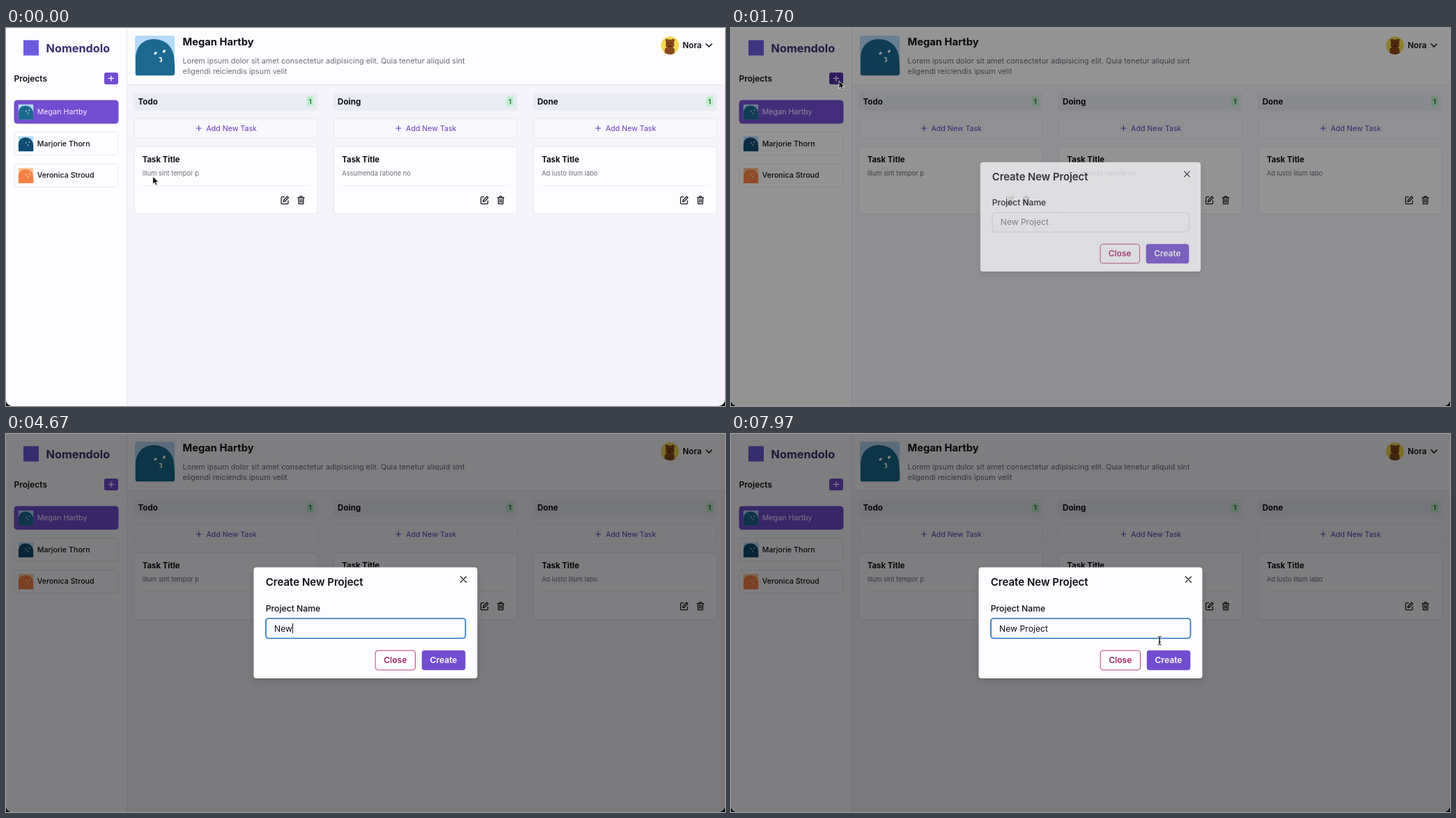
An HTML page for the animation above (8 s loop, 1032 by 543 pixels).

```html
<!DOCTYPE html>
<html lang="en">
<head>
<meta charset="utf-8">
<title>Project board</title>
<style>
  html, body { margin: 0; width: 100%; height: 100%; overflow: hidden; background: #000; }
  svg { display: block; width: 1032px; height: 543px; border-radius: 0 0 9px 9px; }
  text { font-family: Inter, sans-serif; white-space: pre; }
  .icon { fill: none; stroke: #18181d; stroke-width: 1.3; stroke-linecap: round; stroke-linejoin: round; }
  #panel { filter: drop-shadow(0 3px 4px rgba(0, 0, 0, .14)); }
</style>
</head>
<body>
<svg id="stage" viewBox="0 0 1032 543"></svg>
<script>
const LOOP = 8000;
const PURPLE = '#734dd1', WHITE = '#fdfcff', INK = '#0e0d13', LINE = '#e7e6ee', GREY = '#6c6c78';

const text = (x, y, size, weight, fill, content, extra = '') =>
  `<text x="${x}" y="${y}" font-size="${size}" font-weight="${weight}" fill="${fill}" ${extra}>${content}</text>`;
const rect = (x, y, w, h, r, fill, extra = '') =>
  `<rect x="${x}" y="${y}" width="${w}" height="${h}" rx="${r}" fill="${fill}" ${extra}/>`;
const icon = (x, y, d, extra = '') =>
  `<path class="icon" transform="translate(${x} ${y})" d="${d}" ${extra}/>`;
const stroke = (color, width = 1) => `stroke="${color}" stroke-width="${width}"`;

const PLUS = 'M-3.6 0H3.6M0-3.6V3.6';
const EDIT = 'M-1-4.5H-4A1.2 1.2 0 0 0-5.2-3.3V4.2A1.2 1.2 0 0 0-4 5.4H3.5A1.2 1.2 0 0 0 4.7 4.2V1' +
  'M3.4-5.2L5.2-3.4L0 1.8L-2.2 2.3L-1.7 .1Z';
const TRASH = 'M-4.6-3.6H4.6M-3.6-3.6L-3.2 5.4H3.2L3.6-3.6M-1.6-3.8V-5.4H1.6V-3.8M-1.1-1.2V3.2M1.1-1.2V3.2';
const BEAM = 'M-2.5-6Q0-6 0-4.5V4.5Q0 6-2.5 6M2.5-6Q0-6 0-4.5V4.5Q0 6 2.5 6M-1.5 2H1.5';

function avatar(x, y, size, back, body) {
  return `<svg x="${x}" y="${y}" width="${size}" height="${size}" viewBox="0 0 57 57">
    <g clip-path="url(#round)">
      <rect width="57" height="57" fill="${back}"/>
      <path d="M1 58V33C1 15 12 5 27 5C43 5 55 16 56 32L58 58Z" fill="${body}"/>
      <g fill="none" stroke="#fff" stroke-linecap="round">
        <path d="M28.8 25.6L30 24.6M41.2 22.9L42.2 21.7" stroke-width="3.2"/>
        <path d="M35 31.5Q39 30.5 37.4 33.6Q40 35.5 36 37.2" stroke-width="1.5"/>
      </g>
    </g></svg>`;
}

const projects = [
  ['Megan Hartby', '#b5dafa', '#1b698f'],
  ['Marjorie Thorn', '#b5dafa', '#0f4b73'],
  ['Veronica Stroud', '#fbc39c', '#f58244'],
];
const columns = [
  ['Todo', 'Illum sint tempor p'],
  ['Doing', 'Assumenda ratione no'],
  ['Done', 'Ad iusto illum labo'],
];

function projectItem([name, back, body], i) {
  const y = 104 + i * 45.7;
  const box = rect(12, y, 149, 33, 4, i ? WHITE : PURPLE, stroke(i ? LINE : PURPLE));
  return box + avatar(17.5, y + 5.6, 22, back, body) +
    text(44.7, y + 20, 10.7, i ? 500 : 400, i ? INK : '#f3efff', name);
}

function column([title, detail], i) {
  return `<g transform="translate(${183.5 + i * 286.6} 0)">` +
    rect(0, 93.5, 264, 25, 3, '#e9edf3') +
    text(6, 109.8, 11.6, 700, INK, title) +
    rect(248, 98.5, 10.5, 14, 3, '#bdf0cc') +
    text(253.2, 109, 9, 600, '#17502e', 1, 'text-anchor="middle"') +
    rect(.5, 130, 263, 28, 3, '#f8f7fc', stroke(LINE)) +
    icon(93.3, 144, PLUS, 'style="stroke:#643bbd;stroke-width:1.1"') +
    text(104, 147.9, 10.6, 400, '#643bbd', 'Add New Task') +
    rect(.5, 170.5, 263, 96.5, 4, WHITE, stroke(LINE)) +
    text(12.2, 193, 11.4, 700, INK, 'Task Title') +
    text(12.2, 211.6, 9.3, 400, GREY, detail) +
    rect(12, 226, 240, 1, 0, '#eeedf3') +
    icon(216.8, 247.2, EDIT) + icon(240, 247.2, TRASH) + '</g>';
}

const bear = `<g clip-path="url(#face)">
  <circle cx="953" cy="25" r="13" fill="#f3d850"/>
  <g fill="#87481d">
    <circle cx="948.6" cy="17.6" r="2.2"/><circle cx="957.6" cy="17.6" r="2.2"/>
    <rect x="947" y="16.5" width="12" height="13" rx="5"/><rect x="945.5" y="28" width="14" height="12" rx="4"/>
  </g>
  <path d="M950.5 21.5h.1M955.5 21.5h.1M951.5 26h3" stroke="#3d1d0b" stroke-width="1.5" stroke-linecap="round"/></g>`;

const modal = rect(355.5, 191.5, 321, 159.5, 4, WHITE, 'id="panel"') +
  text(372.8, 218.4, 15, 600, INK, 'Create New Project') +
  icon(656.5, 209, 'M-4-4L4 4M4-4L-4 4', 'style="stroke-width:1.2"') +
  text(372.8, 254.6, 12.2, 500, INK, 'Project Name') +
  rect(373, 265, 286.5, 28.5, 4, WHITE, 'id="field"') +
  text(385, 283.5, 12.2, 400, INK, '', 'id="value"') +
  rect(0, 272, 1, 14, 0, INK, 'id="caret"') +
  rect(530.2, 311, 57.3, 28, 4, WHITE, stroke('#bd3f80')) +
  text(558.8, 329.3, 12.1, 600, '#a52567', 'Close', 'text-anchor="middle"') +
  rect(596.8, 310.7, 62.6, 28.6, 4, PURPLE) +
  text(628, 329.3, 12.1, 600, '#fff', 'Create', 'text-anchor="middle"');

document.getElementById('stage').innerHTML = `
  <defs>
    <clipPath id="round"><rect width="57" height="57" rx="4"/></clipPath>
    <clipPath id="face"><circle cx="953" cy="25" r="13"/></clipPath>
  </defs>` +
  rect(0, 0, 1032, 543, 0, '#f5f4fa') +
  rect(0, 0, 173, 543, 0, WHITE) + rect(173, 0, 859, 81, 0, WHITE) +
  rect(173, 0, 1, 543, 0, LINE) + rect(173, 81, 859, 1, 0, LINE) +
  rect(25, 17.5, 22, 22, 0, '#6a5be0') +
  text(57.5, 35, 16.3, 700, '#3c2f70', 'Nomendolo') +
  text(11.5, 76.7, 12, 600, INK, 'Projects') +
  rect(141, 64, 20, 17, 3, PURPLE, 'id="add"') +
  icon(151, 72.4, PLUS, 'style="stroke:#fff;stroke-width:1.2"') +
  projects.map(projectItem).join('') +
  avatar(185, 11, 57.3, ...projects[0].slice(1)) +
  text(253.6, 24.8, 14.7, 700, INK, projects[0][0]) +
  text(253.6, 50.6, 10.8, 400, GREY,
    'Lorem ipsum dolor sit amet consectetur adipisicing elit. Quia tenetur aliquid sint') +
  text(253.6, 65.6, 10.8, 400, GREY, 'eligendi reiciendis ipsum velit') +
  bear + text(971.3, 29.2, 11.6, 600, INK, 'Nora') +
  icon(1009, 25, 'M-4-2L0 2L4-2', 'style="stroke-width:1.7"') +
  columns.map(column).join('') +
  rect(0, 0, 1032, 543, 0, '#000', 'id="shade"') +
  `<g id="modal">${modal}</g>
  <path id="arrow" d="M0 0V11L2.6 8.7L4.4 12.6L6.3 11.8L4.6 8H8.1Z" fill="#000" stroke="#fff" stroke-width=".8"/>
  <g id="beam" fill="none">
    <path d="${BEAM}" stroke="#fff" stroke-width="2.2" opacity=".7"/>
    <path d="${BEAM}" stroke="#111"/>
  </g>`;

const el = id => document.getElementById(id);
const set = (id, attrs) => Object.entries(attrs).forEach(([k, v]) => el(id).setAttribute(k, v));
const clamp = v => Math.min(1, Math.max(0, v));

// Same curve as CSS cubic-bezier().
const bezier = (x1, y1, x2, y2) => x => {
  const at = (s, a, b) => 3 * a * s * (1 - s) ** 2 + 3 * b * s * s * (1 - s) + s ** 3;
  let lo = 0, hi = 1;
  for (let i = 0; i < 20; i++) {
    const s = (lo + hi) / 2;
    if (at(s, x1, x2) < x) lo = s; else hi = s;
  }
  return at(lo, y1, y2);
};
const ease = bezier(.25, .1, .25, 1), easeOut = bezier(0, 0, .2, 1);

const OPEN = 1593, FOCUS = 3000;
const VALUE = 'New Project';
const keys = [4250, 4420, 4560, 4800, 5050, 5250, 5500, 5700, 5800, 6100, 6400];
// Pointer moves: start, end, target x, target y.
const moves = [[150, 1250, 155, 76], [1850, 2660, 415, 279], [7200, 8080, 624, 297.5]];

function pointer(t) {
  let x = 210.8, y = 213.3;
  for (const [start, end, tx, ty] of moves) {
    const u = clamp((t - start) / (end - start)), e = u * u * (3 - 2 * u);
    x += (tx - x) * e;
    y += (ty - y) * e;
  }
  return [x, y];
}

function draw(t) {
  const p = easeOut(clamp((t - OPEN) / 300)), scale = .95 + .05 * p;
  set('shade', { opacity: ease(clamp((t - OPEN) / 200)) / 2 });
  set('modal', { opacity: p, transform: `translate(516 271.2) scale(${scale}) translate(-516 -271.2)` });

  const [x, y] = pointer(t);
  const overAdd = x > 141 && x < 161 && y > 64 && y < 81;
  set('add', { fill: overAdd ? '#4f2fa3' : PURPLE });

  const typed = keys.filter(k => k <= t), focused = t >= FOCUS;
  el('value').textContent = typed.length ? VALUE.slice(0, typed.length) : VALUE;
  set('value', { fill: typed.length ? INK : '#767684' });
  set('field', { stroke: focused ? '#2273bd' : '#dcdbe3', 'stroke-width': focused ? 1.7 : 1 });

  const last = typed.at(-1) ?? FOCUS;
  const caretOn = focused && Math.floor((t - last) / 500) % 2 === 0;
  set('caret', { x: 385 + (typed.length && el('value').getComputedTextLength()), opacity: +caretOn });

  const shown = t < keys[0] || t >= moves[2][0], overField = y > 264;
  const transform = `translate(${x} ${y})`;
  set('arrow', { transform, opacity: +(shown && !overField) });
  set('beam', { transform, opacity: +(shown && overField) });
}

function tick() {
  draw(performance.now() % LOOP);
  requestAnimationFrame(tick);
}
tick();
</script>
</body>
</html>
```
